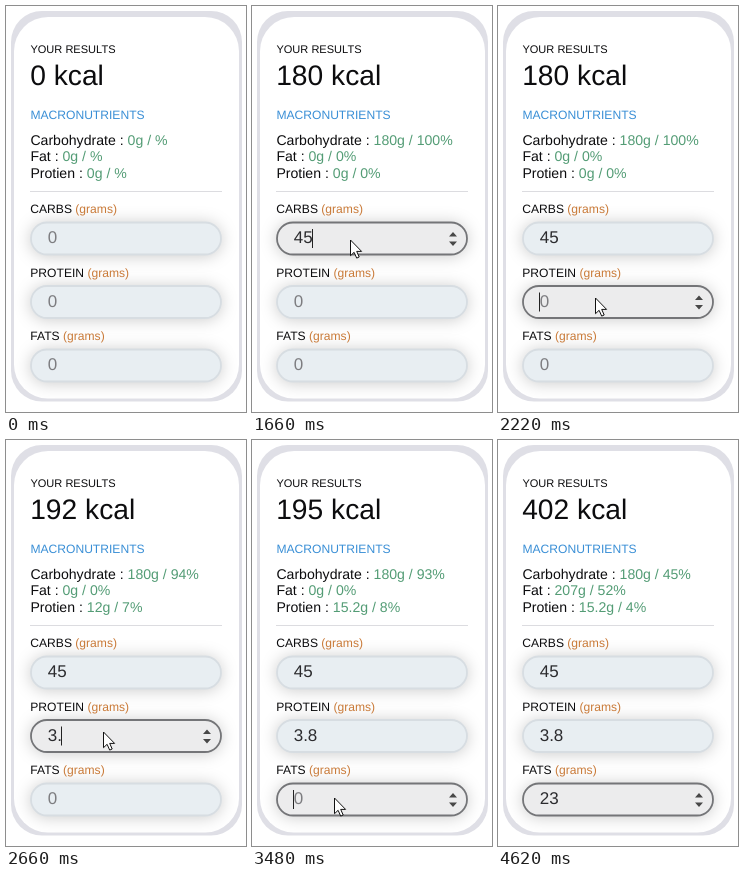
Animation of 240x406 px, one loop 4720 ms. Source, as an HTML page:

```html
<!DOCTYPE html>
<html lang="en">
<head>
<meta charset="utf-8">
<title>Macronutrient calculator</title>
<style>
  html, body { margin: 0; width: 100%; height: 100%; overflow: hidden; background: #fff; }
  svg { display: block; width: 240px; height: 406px; font-family: "Liberation Sans", Arial, sans-serif; }
  text { fill: #0c0c0e; white-space: pre; text-rendering: geometricPrecision; }
  .green { fill: #539c75; }
  .unit { fill: #c97a38; }
</style>
</head>
<body>
<svg id="stage" viewBox="0 0 240 406">
  <defs>
    <filter id="soft" x="-20%" y="-100%" width="140%" height="300%" color-interpolation-filters="sRGB">
      <feDropShadow dx="0" dy="1" stdDeviation="8" flood-color="#000" flood-opacity=".2"/>
    </filter>
    <clipPath id="inside"><rect x="8" y="11" width="225" height="381.5" rx="34"/></clipPath>
  </defs>
  <rect x="5" y="5" width="231" height="390.5" rx="31" fill="#dfdfe6"/>
  <rect x="8" y="11" width="225" height="381.5" rx="34" fill="#fff"/>
  <text x="24.4" y="47" font-size="11.05">YOUR RESULTS</text>
  <text id="total" x="24.2" y="79.3" font-size="28.2"></text>
  <text x="24.4" y="113" font-size="12.1" style="fill:#3a8fd6">MACRONUTRIENTS</text>
  <g id="macros" font-size="14.1"></g>
  <path d="M24 185.5H216" stroke="#dcdce0"/>
  <g id="fields" clip-path="url(#inside)"></g>
  <path id="cursor" d="M.5 .5V16.2L4.1 12.8L6.7 18.6L9.2 17.5L6.7 11.9H11.6Z"
        fill="#fff" stroke="#111" stroke-linejoin="round"/>
</svg>
<script>
const LOOP = 4720;
const $ = id => document.getElementById(id);

// typed: [time, content]; caret: [from, to]; on/off: highlight start and end
const fields = [
  { label: 'CARBS', macro: 'Carbohydrate', kcal: 4, on: 860, off: 2030,
    typed: [[1500, '4'], [1620, '45']], caret: [[1260, 1760]] },
  { label: 'PROTEIN', macro: 'Protien', kcal: 4, on: 1830, off: 3310,
    typed: [[2300, '3'], [2600, '3.'], [2780, '3.8']], caret: [[2080, 2940], [3100, 3310]] },
  { label: 'FATS', macro: 'Fat', kcal: 9, on: 3150, off: LOOP + 500,
    typed: [[4240, '2'], [4400, '23']], caret: [[3400, 3660], [4220, 4540]] }
];
const [carbs, protein, fats] = fields;

// Pointer stops: time, x, y
const stops = [[820, 212, 250], [930, 98, 233.5], [1720, 98, 233.5], [1880, 97, 291.5],
               [2980, 97, 291.5], [3180, 85, 346.5], [3320, 85, 346.5], [3480, 82, 357.5]];
const POINTER_END = 4230;

fields.forEach((f, i) => {
  const y = 216 + i * 63.5;
  $('fields').insertAdjacentHTML('beforeend', `<g>
    <rect x="25" y="${y + .5}" width="190" height="32" rx="16" filter="url(#soft)"/>
    <text x="24.3" y="${y - 9}" font-size="12.1">${f.label} <tspan class="unit">(grams)</tspan></text>
    <text class="value" x="41.7" y="${y + 21.4}" font-size="17"></text>
    <path class="caret" d="M0 ${y + 7}v19" stroke="#222"/>
    <path class="spin" d="M197 ${y + 14.4}l4-4.5 4 4.5zm0 5l4 4.5 4-4.5z" fill="#484848"/>
  </g>`);
  const g = $('fields').lastElementChild;
  f.box = g.querySelector('rect');
  f.value = g.querySelector('.value');
  f.caretLine = g.querySelector('.caret');
  f.spin = g.querySelector('.spin');
});

[carbs, fats, protein].forEach((f, i) => {
  $('macros').insertAdjacentHTML('beforeend',
    `<text x="24.4" y="${139 + i * 16.4}">${f.macro} : <tspan class="green"></tspan></text>`);
  f.out = $('macros').lastElementChild.querySelector('tspan');
});

const clamp = v => Math.max(0, Math.min(1, v));
const ease = v => v * v * (3 - 2 * v);
const show = (el, on) => el.setAttribute('visibility', on ? 'visible' : 'hidden');
const mix = (a, b, k) => `rgb(${a.map((v, i) => Math.round(v + (b[i] - v) * k))})`;
const setText = (el, s) => { if (el.textContent !== s) el.textContent = s; };

function contentAt(f, t) {
  return f.typed.reduce((s, [at, text]) => t >= at ? text : s, '');
}

function drawField(f, t) {
  const text = contentAt(f, t);
  const k = clamp((t - f.on) / 80) * (1 - clamp((t - f.off) / 80));
  f.box.setAttribute('fill', mix([232, 238, 242], [236, 236, 237], clamp(k * 2 - 1)));
  f.box.setAttribute('stroke', mix([215, 221, 226], [116, 117, 120], k));
  f.box.setAttribute('stroke-width', 1.8);
  setText(f.value, text || '0');
  f.value.style.fill = text ? '#2b2b2e' : '#7d7d80';
  show(f.spin, t >= f.on && t < f.off);
  show(f.caretLine, f.caret.some(([a, b]) => t >= a && t < b));
  const width = text ? f.value.getComputedTextLength() : 0;
  f.caretLine.setAttribute('transform', `translate(${Math.round(41 + width) + .5})`);
  f.energy = (parseFloat(text) || 0) * f.kcal;
}

function drawPointer(t) {
  const shown = t >= stops[0][0] && t < POINTER_END;
  show($('cursor'), shown);
  if (!shown) return;
  let i = 0;
  while (i < stops.length - 2 && t >= stops[i + 1][0]) i++;
  const [t0, x0, y0] = stops[i], [t1, x1, y1] = stops[i + 1];
  const k = ease(clamp((t - t0) / (t1 - t0)));
  $('cursor').setAttribute('transform', `translate(${x0 + (x1 - x0) * k} ${y0 + (y1 - y0) * k})`);
}

function draw() {
  const t = performance.now() % LOOP;
  fields.forEach(f => drawField(f, t));
  const total = fields.reduce((sum, f) => sum + f.energy, 0);
  setText($('total'), Math.round(total) + ' kcal');
  fields.forEach(f => {
    const share = total ? Math.ceil(f.energy / total * 100) : '';
    setText(f.out, `${+f.energy.toFixed(1)}g / ${share}%`);
  });
  drawPointer(t);
  requestAnimationFrame(draw);
}
draw();
</script>
</body>
</html>
```
